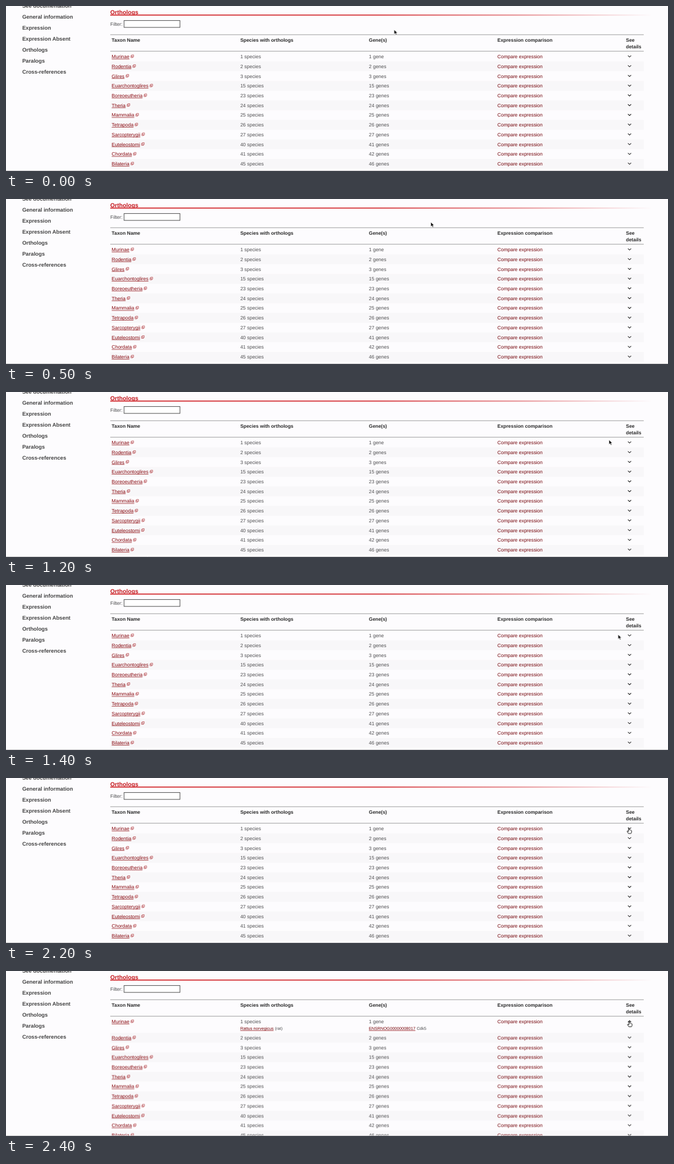
Write an HTML page that moves like this. It is 1200x300 px and loops after 2500 ms.

```html
<!DOCTYPE html>
<html lang="en">
<head>
<meta charset="utf-8">
<title>Orthologs</title>
<style>
  html, body { margin: 0; width: 100%; height: 100%; overflow: hidden; background: #fdfcfe; }
  svg { display: block; width: 1200px; height: 300px; }
  text { font: 8.88px "Liberation Sans", Arial, sans-serif; fill: #4e4e50; text-rendering: geometricPrecision; }
  .nav { font-size: 9.7px; font-weight: bold; fill: #444; }
  .head { font-size: 8.8px; font-weight: bold; fill: #2a2a2a; }
  .title { font-size: 10.65px; font-weight: bold; fill: #c4161c; }
  .taxon { fill: #86060c; }
  .compare { fill: #74040a; }
  .small { font-size: 7.55px; }
  .small.taxon { fill: #780408; }
  .rule { stroke: #999; }
  .chevron { fill: none; stroke: #222; stroke-width: 1.1; }
  .icon { fill: none; stroke: #b03a3e; stroke-width: .7; }
</style>
</head>
<body>
<svg id="stage" viewBox="0 0 1200 300">
  <defs>
    <linearGradient id="fade" gradientUnits="userSpaceOnUse" x1="189" x2="1172" y1="0" y2="0">
      <stop offset="0" stop-color="#cf1b20"/>
      <stop offset=".5" stop-color="#d2262b"/>
      <stop offset=".75" stop-color="#e27b7f"/>
      <stop offset="1" stop-color="#fdfcfe"/>
    </linearGradient>
  </defs>
  <rect width="1200" height="300" fill="#fdfcfe"/>
  <g id="page"></g>
  <g id="rows"></g>
  <path d="M0 299.5H1200" stroke="#c4c4c6"/>
  <g id="pointer">
    <path id="arrow" d="M0 0V8.4L2 6.6L3.5 9.7L5 9L3.6 6H6.2Z" fill="#111" stroke="#fff" stroke-width=".7"/>
    <path id="hand" d="M-1.6 -4.3Q-.7 -5.2 0 -4.2V-1Q1 -1.7 1.6 -.8Q2.6 -1.2 3 -.2Q4 -.4 4 .8V3Q3.8 4.2 3 5.4H-1.8L-4 2Q-4.6 .7 -3.2 .7L-1.7 2Z"
      fill="#fff" stroke="#111" stroke-width="1" stroke-linejoin="round"/>
  </g>
</svg>
<script>
const LOOP = 2500, STEP = 100;
const OPEN_AT = 2300, HAND_AT = 1700;
const ROW = 17.73, TOP = 83.1, SHIFT = 11.6;
const byId = id => document.getElementById(id);
const page = byId("page"), rows = byId("rows");

function add(parent, tag, attrs = {}, content = "") {
  const node = document.createElementNS("http://www.w3.org/2000/svg", tag);
  for (const key in attrs) node.setAttribute(key, attrs[key]);
  node.textContent = content;
  parent.append(node);
  return node;
}
const label = (parent, x, y, content, cls = "") => add(parent, "text", { x, y, class: cls }, content);
const line = (parent, d, cls) => add(parent, "path", { d, class: cls });

// Returns the right edge of the link text
function link(parent, x, y, content, cls) {
  const end = x + label(parent, x, y, content, cls).getComputedTextLength();
  add(parent, "path", { d: `M${x} ${y + 1.3}H${end}`, stroke: "#94161a", "stroke-width": .8 });
  return end;
}

["See documentation", "General information", "Expression", "Expression Absent",
 "Orthologs", "Paralogs", "Cross-references"]
  .forEach((name, i) => label(page, 29.4, 2.7 + i * 20.13, name, "nav"));

label(page, 189, 14.8, "Orthologs", "title");
add(page, "rect", { x: 189, y: 15.6, width: 983, height: 1.8, fill: "url(#fade)" });
label(page, 189, 36.2, "Filter:");
add(page, "rect", { x: 214, y: 26.4, width: 101.3, height: 12.5, fill: "#fff", stroke: "#444" });

line(page, "M189 52.2H1156", "rule");
line(page, "M189 82.2H1156", "rule");
[[191.6, "Taxon Name"], [424.7, "Species with orthologs"], [657.8, "Gene(s)"],
 [890.8, "Expression comparison"], [1123.8, "See"]]
  .forEach(([x, name]) => label(page, x, 64.8, name, "head"));
label(page, 1123.8, 76.8, "details", "head");

function tableRow(parent, i, [name, species, genes = species]) {
  const top = TOP + i * ROW, base = top + 12;
  if (i % 2) add(parent, "rect", { x: 189, y: top, width: 967, height: ROW, fill: "#f8f7f9" });
  const end = link(parent, 191.6, base, name, "taxon");
  const x = end + 2.7, y = base - 6.2;
  line(parent, `M${x + 1.4} ${y}H${x + 5}V${y + 3.6}H${x + 1.4}ZM${x + 1.4} ${y + 1.4}H${x}V${y + 5}H${x + 3.6}V${y + 3.6}M${x + 2.4} ${y + 2.6}L${x + 4} ${y + 1}`, "icon");
  label(parent, 424.7, base, species + " species");
  label(parent, 657.8, base, genes + (genes > 1 ? " genes" : " gene"));
  label(parent, 890.8, base, "Compare expression", "compare");
  return line(parent, `M1127.4 ${base - 5}L1130.3 ${base - 2.3}L1133.2 ${base - 5}`, "chevron");
}

const [first, ...others] = [
  ["Murinae", 1], ["Rodentia", 2], ["Glires", 3], ["Euarchontoglires", 15],
  ["Boreoeutheria", 23], ["Theria", 24], ["Mammalia", 25], ["Tetrapoda", 26],
  ["Sarcopterygii", 27], ["Euteleostomi", 40, 41], ["Chordata", 41, 42], ["Bilateria", 45, 46]
];
const down = tableRow(page, 0, first);
others.forEach((data, i) => tableRow(rows, i + 1, data));

const details = add(page, "g");
const speciesEnd = link(details, 424.7, 107.1, "Rattus norvegicus", "small taxon");
label(details, speciesEnd + 2.3, 107.1, "(rat)", "small");
const geneEnd = link(details, 657.8, 107.1, "ENSRNOG00000008017", "small taxon");
label(details, geneEnd + 2.3, 107.1, "Cdk5", "small");
line(details, "M1127.4 93L1130.3 90.3L1133.2 93", "chevron");

// Pointer position at every step
const path = [
  [703.5, 43], [704, 43], [707, 43], [716, 42.5], [737, 42], [770, 42], [817, 45],
  [877, 52], [938, 62], [990.5, 71], [1034, 78], [1070, 83], [1093, 87], [1104, 89],
  [1109.5, 90], [1113, 91], [1119, 92.5], [1127, 94.5], [1130, 95.5], [1130, 95.5],
  [1130.4, 95.5], [1130.2, 95.5], [1130, 95.5], [1130, 95.5], [1130.8, 96]
];
const timing = { duration: LOOP, iterations: Infinity };
const play = (node, frames) =>
  node.animate(frames.map(frame => ({ easing: "step-end", ...frame })), timing).startTime = 0;
const toggle = (node, time, before, after) => play(node, [
  { ...before, offset: 0 }, { ...after, offset: time / LOOP }, { ...after, offset: 1 }
]);
const move = (x, y) => ({ transform: `translate(${x}px, ${y}px)` });
const shown = { opacity: 1 }, hidden = { opacity: 0 };

play(byId("pointer"), [
  ...path.map(([x, y], i) => ({ ...move(x, y), offset: i * STEP / LOOP })),
  { ...move(...path.at(-1)), offset: 1 }
]);
toggle(byId("arrow"), HAND_AT, shown, hidden);
toggle(byId("hand"), HAND_AT, hidden, shown);
toggle(down, OPEN_AT, shown, hidden);
toggle(details, OPEN_AT, hidden, shown);
toggle(rows, OPEN_AT, move(0, 0), move(0, SHIFT));
</script>
</body>
</html>
```
